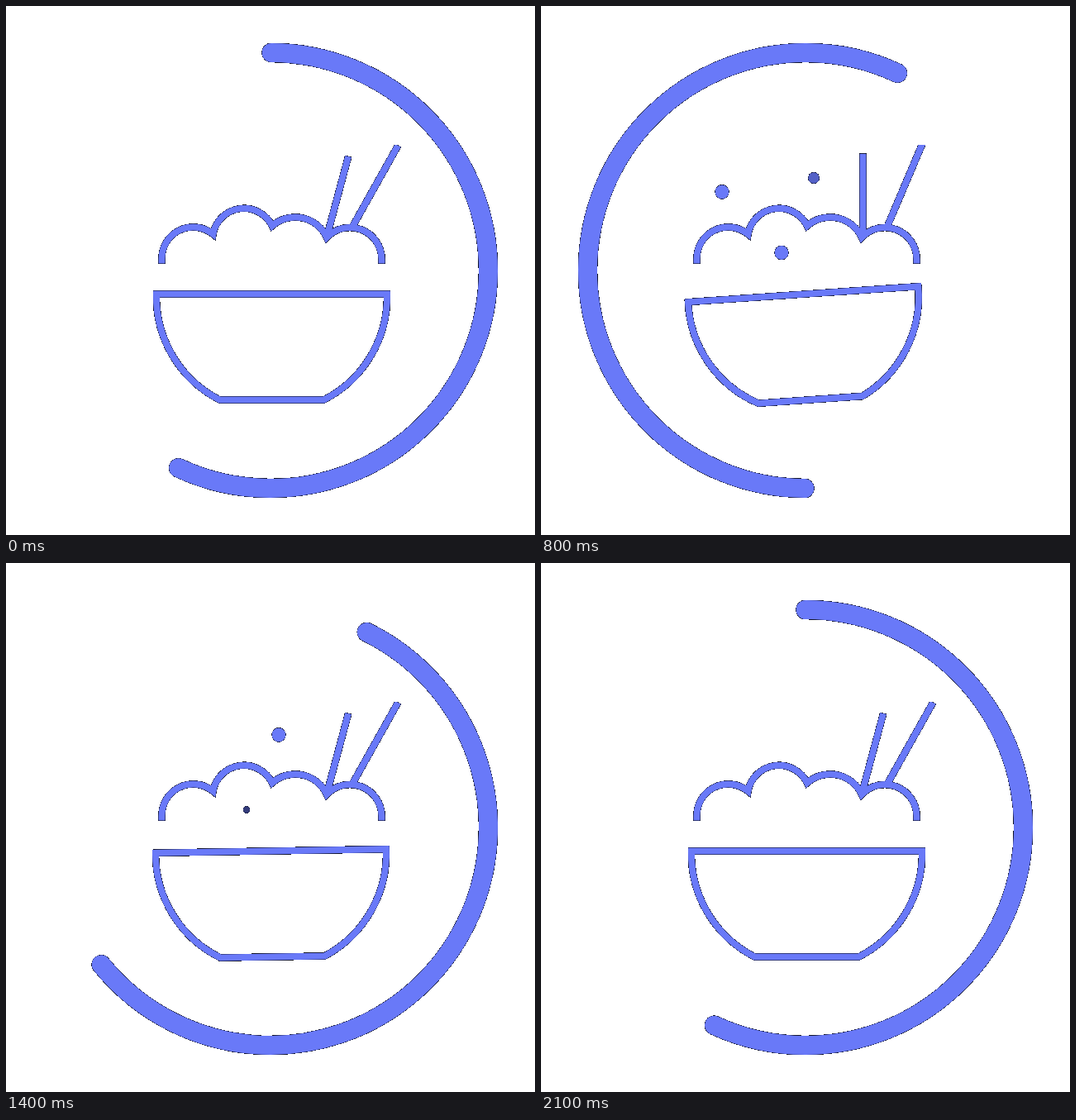
Recreate the animation shown at these times as an HTML page with a canvas. Size 640x640 px, loop 2420 ms.

```html
<!DOCTYPE html>
<html lang="en">
<head>
<meta charset="utf-8">
<title>Rice bowl loader</title>
<style>
  html, body { margin: 0; width: 100%; height: 100%; overflow: hidden; background: #fff; }
  canvas { display: block; width: 640px; height: 640px; }
</style>
</head>
<body>
<canvas width="640" height="640"></canvas>
<script>
const SIZE = 640, LOOP = 2420, BLUE = '#6979f8', RAD = Math.PI / 180;
const ctx = document.querySelector('canvas').getContext('2d', { willReadFrequently: true });

const bowl = new Path2D('M182 348.5H461A140 140 0 0 1 384.5 476.5H258.5A140 140 0 0 1 182 348.5Z');
const rice = new Path2D('M188.5 311.5V306A38 38 0 0 1 250.5 276A38 38 0 0 1 322 266' +
  'A42 42 0 0 1 388 280A38.5 38.5 0 0 1 454.5 306V311.5');

const clamp = v => Math.max(0, Math.min(1, v));

// Eased progress from 0 to 1 between two times
function ease(t, from, to) {
  const u = clamp((t - from) / (to - from));
  return u * u * (3 - 2 * u);
}

// Tilt to high by t1, to low by t2, rest until t3, back to zero by t4
function swing(t, high, low, t1, t2, t3, t4) {
  return high * ease(t, 0, t1) + (low - high) * ease(t, t1, t2) - low * ease(t, t3, t4);
}

// Steady at first, then about twice as fast, ending after two turns
function ringAngle(t) {
  const u = clamp((t - 1080) / 1020);
  return 0.225 * Math.min(t, 1080) + 445 * u + 32 * u * u;
}

function turned(x, y, deg, draw) {
  ctx.save();
  ctx.translate(x, y);
  ctx.rotate(deg * RAD);
  draw();
  ctx.restore();
}

function drawRing(t) {
  const start = ringAngle(t) - 90;
  ctx.lineCap = 'round';
  ctx.lineWidth = 23;
  ctx.beginPath();
  ctx.arc(320, 320, 263.5, start * RAD, (start + 204.8) * RAD);
  ctx.stroke();
}

function drawStick(x, y, length, deg) {
  turned(x, y, deg, () => {
    ctx.beginPath();
    ctx.moveTo(0, 0);
    ctx.lineTo(0, -length);
    ctx.stroke();
  });
}

function drawFood(t) {
  ctx.lineCap = 'butt';
  ctx.lineWidth = 8;
  turned(321.5, 412.5, swing(t, 4.4, -4.9, 220, 950, 950, 1580), () => {
    ctx.translate(-321.5, -412.5);
    ctx.stroke(bowl);
  });
  ctx.stroke(rice);
  drawStick(389.5, 274, 95.3, 15 + swing(t, 15, -15, 200, 730, 1020, 1380));

  // The right stick is cut off by the edges of its area
  ctx.save();
  ctx.beginPath();
  ctx.rect(0, 168, 482, SIZE);
  ctx.clip();
  drawStick(418, 269, 115, 29.3 + swing(t, 17, -6.4, 280, 820, 1020, 1380));
  ctx.restore();
}

function drawDot(x, y, i, t) {
  const grown = clamp((t - 250 * i) / 375);
  const shrunk = clamp((t - 1095 - 180 * i) / 250);
  const scale = Math.min(grown, 1 - shrunk);
  ctx.globalAlpha = scale;
  ctx.beginPath();
  ctx.arc(x, y, 8.4 * scale, 0, 2 * Math.PI);
  ctx.fill();
  ctx.globalAlpha = 1;
}

// Half-covered pixels mix with black instead of the page, giving a hard dark rim
function darkenEdges() {
  const image = ctx.getImageData(0, 0, SIZE, SIZE), d = image.data;
  for (let i = 0; i < d.length; i += 4) {
    const a = d[i + 3];
    if (a === 0 || a === 255) continue;
    for (let c = 0; c < 3; c++) d[i + c] *= a / 255;
    d[i + 3] = a > 24 ? 255 : 0;
  }
  ctx.putImageData(image, 0, 0);
}

function render(t) {
  ctx.clearRect(0, 0, SIZE, SIZE);
  ctx.strokeStyle = ctx.fillStyle = BLUE;
  drawRing(t);
  drawFood(t);
  drawDot(219, 225, 0, t);
  drawDot(291, 298.5, 1, t);
  drawDot(330, 208, 2, t);
  darkenEdges();
}

const begin = performance.now();
function tick() {
  render((performance.now() - begin) % LOOP);
  requestAnimationFrame(tick);
}
tick();
</script>
</body>
</html>
```
